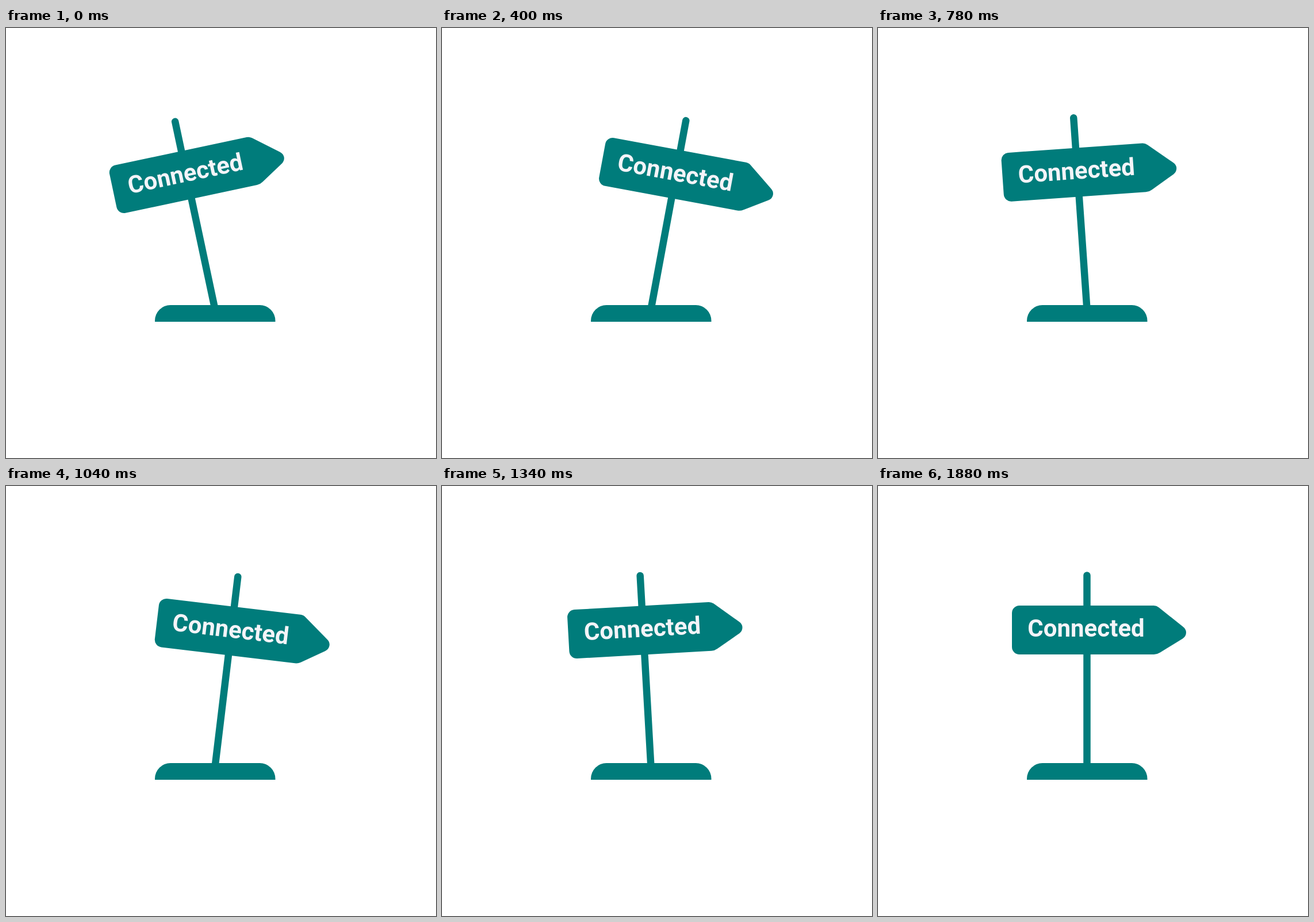
Recreate the animation shown at these times as an HTML page. Size 748 by 748 pixels, loop 2.12 s.

```html
<!DOCTYPE html>
<html lang="en">
<head>
<meta charset="utf-8">
<title>Swinging signpost</title>
<style>
  html, body { margin: 0; width: 100%; height: 100%; overflow: hidden; background: #fff; }
  svg { display: block; width: 100vw; height: 100vh; fill: #007c7b; }
  text { font: 700 42px Roboto, sans-serif; fill: #f4f4f8; }
</style>
</head>
<body>
<svg viewBox="0 0 748 748">
  <g id="sign">
    <path d="M363.5 155.5V489" stroke="#007c7b" stroke-width="12.5" stroke-linecap="round"/>
    <path d="M246 208H479.5Q484.5 208 488.5 211.2L530.5 244.8Q536 249 536 254.8Q536 261.5 530 265.5L490.5 289.8Q485.5 293 480 293H246A13 13 0 0 1 233 280V221A13 13 0 0 1 246 208Z"/>
    <text x="260.3" y="262">Connected</text>
  </g>
  <path d="M259 511V509A27 27 0 0 1 286 482H441.5A27 27 0 0 1 468.5 509V511Z"/>
</svg>
<script>
  const LOOP = 2120, STEP = 20;
  // Extremes of the swing: [time in ms, angle in degrees]
  const swings = [[0, -12], [340, 12], [680, -8], [980, 8], [1280, -4], [1580, 4], [1880, 0]];
  const sign = document.getElementById('sign');
  const ease = p => (1 - Math.cos(Math.PI * p)) / 2;

  function angleAt(t) {
    const next = swings.findIndex(([time]) => time > t);
    if (next < 0) return 0;
    const [t0, a0] = swings[next - 1], [t1, a1] = swings[next];
    return a0 + (a1 - a0) * ease((t - t0) / (t1 - t0));
  }

  const start = performance.now();
  function draw() {
    const elapsed = (performance.now() - start) % LOOP;
    const t = Math.floor(elapsed / STEP) * STEP;
    sign.setAttribute('transform', `rotate(${angleAt(t)} 363.5 489)`);
    requestAnimationFrame(draw);
  }
  draw();
</script>
</body>
</html>
```
